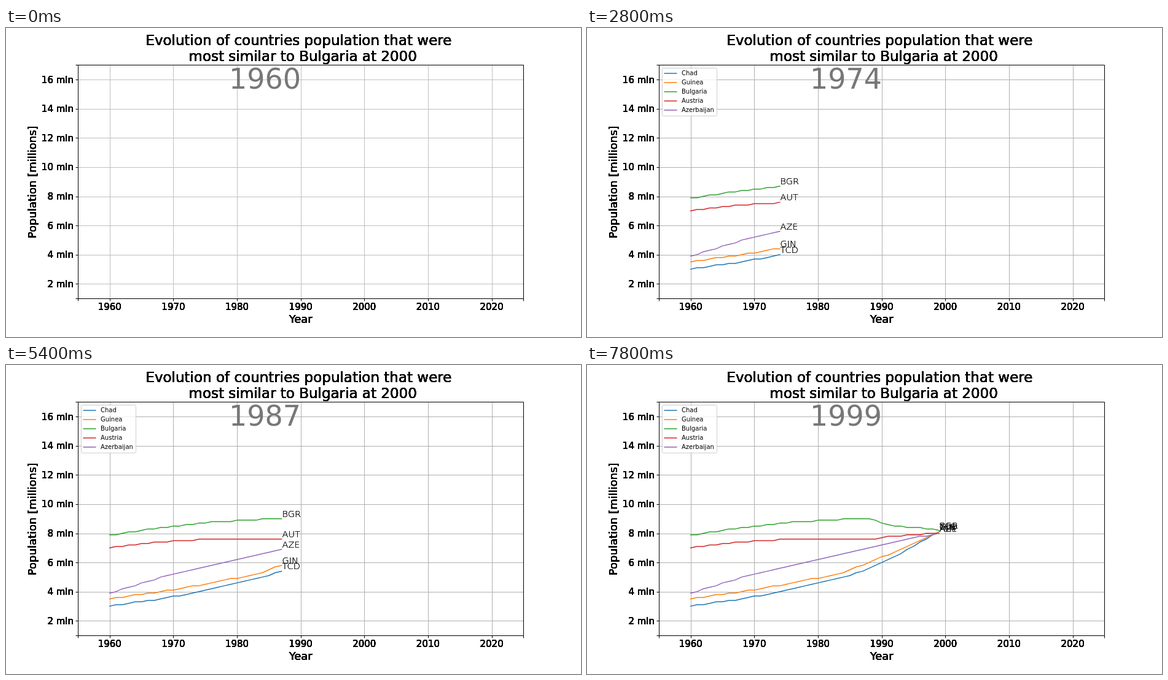
Write an HTML page with a canvas that moves like this. It is 936 px wide and 504 px high and loops after 8 s.

```html
<!DOCTYPE html>
<html lang="en">
<head>
<meta charset="utf-8">
<title>Population over time</title>
<style>
  html, body { margin: 0; width: 100%; height: 100%; overflow: hidden; background: #fff; }
  canvas { display: block; }
</style>
</head>
<body>
<canvas id="chart" width="936" height="504"></canvas>
<script>
const ctx = document.getElementById('chart').getContext('2d');
const LOOP = 8000, STEP = 200, FIRST = 1960;
const AXES = { left: 117, right: 842.4, top: 60.48, bottom: 441 };
const FONT = '"DejaVu Sans", sans-serif';
const LIGHT = '"DejaVu Sans Light", "DejaVu Sans", sans-serif';

// Trend of each country in 100 thousands at a few shared ages (years since FIRST).
const AGES = [0, 8, 16, 24, 28, 32, 39];
const countries = [
  { name: 'Chad', code: 'TCD', color: '#1f77b4', trend: [30.2, 35, 41.6, 49.6, 56, 64, 81] },
  { name: 'Guinea', code: 'GIN', color: '#ff7f0e', trend: [35, 40, 45.7, 53.2, 60, 67.2, 81] },
  { name: 'Bulgaria', code: 'BGR', color: '#2ca02c', trend: [78.8, 83.8, 87.7, 89.7, 89.7, 85.2, 82.4] },
  { name: 'Austria', code: 'AUT', color: '#d62728', trend: [70.2, 74.2, 76, 75.7, 75.8, 78.2, 80.2] },
  { name: 'Azerbaijan', code: 'AZE', color: '#9467bd', trend: [38.9, 49.8, 57.8, 65.8, 70, 74, 80.2] },
];

const xOf = year => AXES.left + (year - 1955) / 70 * (AXES.right - AXES.left);
const yOf = millions => AXES.bottom - (millions - 1) / 16 * (AXES.bottom - AXES.top);
const snap = v => Math.floor(v + 0.5) + 0.5;

// Millions, rounded to one decimal, which gives the lines their small steps.
function population(trend, age) {
  const i = Math.max(1, AGES.findIndex(a => a >= age));
  const part = (age - AGES[i - 1]) / (AGES[i] - AGES[i - 1]);
  return Math.round(trend[i - 1] + (trend[i] - trend[i - 1]) * part) / 10;
}

function line(points, color, width = 1) {
  ctx.strokeStyle = color;
  ctx.lineWidth = width;
  ctx.beginPath();
  points.forEach(([x, y]) => ctx.lineTo(x, y));
  ctx.stroke();
}

function text(str, x, y, size, { align = 'left', color = '#000', font = FONT, weight = 400, layers = 1 } = {}) {
  ctx.font = `${weight} ${size}px ${font}`;
  ctx.textAlign = align;
  ctx.fillStyle = color;
  for (let i = 0; i < layers; i++) ctx.fillText(str, x, y);
}

// Layered text gives the heavy edges of a chart painted over itself.
const heavy = align => ({ align, layers: 8 });

function drawAxes(gridColor) {
  const left = snap(AXES.left), right = snap(AXES.right);
  const top = snap(AXES.top), bottom = snap(AXES.bottom);
  const xTick = x => line([[x, bottom], [x, bottom + 4]], '#000');
  const yTick = y => line([[left - 4, y], [left, y]], '#000');

  for (let year = 1960; year <= 2020; year += 10) {
    const x = snap(xOf(year));
    line([[x, top], [x, bottom]], gridColor);
    xTick(x);
    text(year, xOf(year), 460, 15, heavy('center'));
  }
  for (let m = 2; m <= 16; m += 2) {
    const y = snap(yOf(m));
    line([[left, y], [right, y]], gridColor);
    yTick(y);
    text(m + ' mln', 110, Math.round(yOf(m) + 5.5), 15, heavy('right'));
  }
  [left, right].forEach(xTick);
  [top, bottom].forEach(yTick);

  text('Evolution of countries population that were', 476.4, 28, 23, heavy('center'));
  text('most similar to Bulgaria at 2000', 483.2, 54, 23, heavy('center'));
  text('Year', 479.7, 481, 18, heavy('center'));
  ctx.save();
  ctx.translate(49, 251.3);
  ctx.rotate(-Math.PI / 2);
  text('Population [millions]', 0, 0, 18, heavy('center'));
  ctx.restore();
}

function drawFrame() {
  const left = snap(AXES.left), top = snap(AXES.top);
  ctx.strokeStyle = '#000';
  ctx.lineWidth = 1;
  ctx.strokeRect(left, top, snap(AXES.right) - left, snap(AXES.bottom) - top);
}

function drawCountries(age) {
  ctx.lineJoin = 'round';
  ctx.lineCap = 'square';
  for (const { trend, color } of countries) {
    const points = Array.from({ length: age + 1 }, (_, i) => [xOf(FIRST + i), yOf(population(trend, i))]);
    line(points, color, 1.5);
  }
  ctx.lineCap = 'butt';
  for (const { trend, code } of countries) {
    const x = Math.round(xOf(FIRST + age)), y = Math.round(yOf(population(trend, age)) - 3);
    text(code, x + 0.5, y, 14.5, { font: LIGHT, weight: 200, layers: 2 });
  }
}

function drawLegend() {
  ctx.beginPath();
  ctx.roundRect(122.5, 65.5, 89, 78, 2);
  ctx.fillStyle = 'rgba(255,255,255,.8)';
  ctx.fill();
  ctx.strokeStyle = '#d0d0d0';
  ctx.lineWidth = 1;
  ctx.stroke();
  countries.forEach(({ name, color }, i) => {
    const y = 74 + 15 * i;
    line([[125.5, y], [146.5, y]], color, 1.5);
    text(name, 154, y + 3, 10);
  });
}

function draw(time) {
  const age = Math.floor(time % LOOP / STEP);
  ctx.fillStyle = '#fff';
  ctx.fillRect(0, 0, 936, 504);
  drawAxes(age ? '#b0b0b0' : '#c0c0c0');
  if (age) drawCountries(age);
  drawFrame();
  text(FIRST + age, 421.5, 99, 46, { align: 'center', color: '#777' });
  if (age) drawLegend();
}

const start = performance.now();
function tick() {
  draw(performance.now() - start);
  requestAnimationFrame(tick);
}
tick();
</script>
</body>
</html>
```
